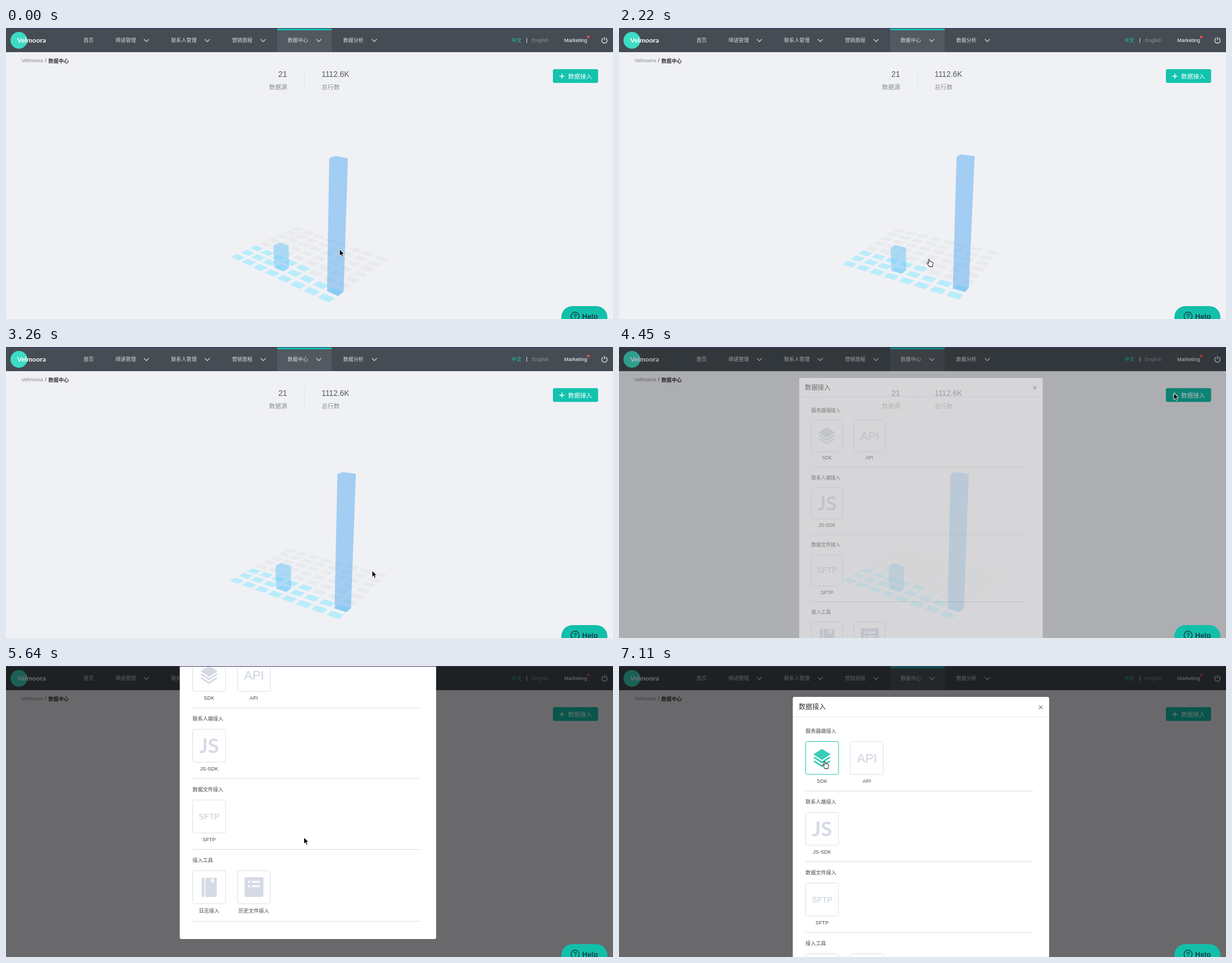
Write an HTML page that moves like this. It is 1081 px wide and 518 px high and loops after 8 s.

```html
<!DOCTYPE html>
<html lang="zh-CN">
<head>
<meta charset="utf-8">
<title>数据中心</title>
<style>
html, body { margin: 0; width: 100%; height: 100%; overflow: hidden; background: #f0f1f5; }
svg { display: block; width: 100%; height: 100%; }
text { font-family: "Liberation Sans", "Noto Sans CJK SC", "Noto Sans CJK", sans-serif; font-size: 9.1px; }
.line { fill: none; stroke-width: 1.3; stroke-linecap: round; stroke-linejoin: round; }
</style>
</head>
<body>
<svg id="stage" viewBox="0 0 1081 518" preserveAspectRatio="none"></svg>
<script>
const STEP = 148.2, LOOP = 8000;
const TEAL = '#12c3ae', PALE = '#d5dae5';

const text = (x, y, s, fill, more = '') => `<text x="${x}" y="${y}" fill="${fill}" ${more}>${s}</text>`;
const rect = (x, y, w, h, fill, more = '') => `<rect x="${x}" y="${y}" width="${w}" height="${h}" fill="${fill}" ${more}/>`;
const size = (px, more = '') => `style="font-size:${px}px;${more}"`;
const mid = 'text-anchor="middle"';

function header() {
  const items = [
    [138, '首页'], [195, '绵语管理', 250], [294, '联系人管理', 358.5],
    [402.5, '营销旅程', 458], [501.5, '数据中心', 557], [600.5, '数据分析', 656]
  ];
  const nav = items.map(([x, s, arrow]) => text(x, 25.2, s, '#d9dbdd') +
    (arrow ? `<path class="line" stroke="#d0d3d6" d="M${arrow - 4} 20.2l4 4.2 4-4.2"/>` : '')).join('');
  return rect(0, 0, 1081, 43, '#454c53') + rect(483, 1, 97, 42, '#525960') + rect(483, 1, 97, 3, '#14bfae') +
    '<circle cx="23" cy="22" r="15" fill="#3edcc4"/>' +
    text(20, 25.5, 'Velmoora', '#fff', size(12, 'font-family:Lato,sans-serif;font-weight:700')) + nav +
    text(900, 25.2, '中文', '#17c5b0') + rect(927, 17.5, 1, 9, '#d9dbdd') + text(936.5, 25, 'English', '#8d9297') +
    text(994, 25, 'Marketing', '#fff', size(9.3)) + '<circle cx="1037" cy="16" r="2.3" fill="#f0504f"/>' +
    '<path class="line" stroke="#e6e7e9" d="M1063 18.4a4.8 4.8 0 1 0 5.6 0M1065.8 16.4v5"/>';
}

function page() {
  return rect(0, 0, 1081, 518, '#f0f1f5') + header() +
    text(27.5, 61.3, 'Velmoora', '#85888c') + text(69.5, 61.3, '/', '#333') +
    text(75.5, 61.6, '数据中心', '#333', 'font-weight="700"') +
    text(500.5, 86.8, '21', '#55585c', size(14) + ' text-anchor="end"') +
    text(468.5, 109.3, '数据源', '#8a8c90', size(10.7)) + rect(531, 72, 1, 40, '#e1e4e8') +
    text(562, 86.8, '1112.6K', '#55585c', size(13.8)) + text(562, 109.3, '总行数', '#8a8c90', size(10.7)) +
    rect(974, 73.3, 80.5, 24.5, TEAL, 'rx="3" id="button"') +
    '<path d="M985.5 85.7h9M990 81.2v9" stroke="#fff" stroke-width="1.4"/>' +
    text(1001, 89.6, '数据接入', '#fff', size(10.7, 'font-weight:500')) +
    '<path id="grey" fill="#e8eaed"/><path id="cyan" fill="#b9ecfb"/>' +
    '<path id="small" fill="rgb(118,200,248)" fill-opacity=".55"/>' +
    '<path id="tall" fill="rgb(100,177,241)" fill-opacity=".55"/>';
}

const LAYERS = '<path d="M361.5 147.5l15.5 9.8-15.5 10-15.5-10z"/>' +
  [163.2, 170].map(y => `<path d="M346 ${y}l2.6-1.7 12.9 8.3 12.9-8.3 2.6 1.7-15.5 10z"/>`).join('');
const BOOK = rect(348.5, 525, 5, 34, PALE, 'rx="1.5"') + rect(355.2, 525, 20.3, 34, PALE, 'rx="1.5"') +
  '<path d="M365.5 526.5h4.6v7.6l-2.3-2-2.3 2z" fill="#fff"/>';
const LIST = rect(425, 524, 33.5, 35, PALE, 'rx="3"') +
  [532, 540].map(y => `<circle cx="432.5" cy="${y}" r="1.9" fill="#fff"/>` + rect(437.5, y - 1.4, 15, 2.8, '#fff', 'rx="1"')).join('');

function card(col, top, name, capY, art, id = '') {
  const x = 332.5 + 79.5 * col;
  return rect(x, top, 58.5, 58.5, '#fff', `rx="3" stroke="#dcdfe6" ${id}`) + art +
    text(x + 29.2, capY, name, '#4a4a4a', mid);
}

function modal() {
  const glyph = (x, y, s, px, more) => text(x, y, s, PALE, mid + ' ' + size(px, more));
  const titles = ['服务器端接入', '联系人端接入', '数据文件接入', '接入工具'];
  const rules = [222, 348, 474, 602];
  return rect(309.5, 55, 456.5, 431 + 148, '#fff', 'rx="3"') +
    text(320, 77.3, '数据接入', '#333', size(12.1, 'font-weight:500')) +
    '<path d="M748 70.5l6 6M754 70.5l-6 6" stroke="#8a8a8a" stroke-width="1.3"/>' +
    rect(309.5, 90, 456.5, 1, '#e6e7ea') +
    titles.map((s, i) => text(332.3, 119.2 + 126 * i, s, '#4a4a4a') + rect(332, rules[i], 405.5, 1, '#dedede')).join('') +
    card(0, 134.5, 'SDK', 207.8, `<g id="layers" fill="${PALE}">${LAYERS}</g>`, 'id="sdk"') +
    card(1, 134.5, 'API', 207.8, glyph(441.7, 171.8, 'API', 22, `stroke:${PALE};stroke-width:.5px`)) +
    card(0, 260.5, 'JS-SDK', 333.8, glyph(361.7, 303, 'JS', 36, 'font-family:Lato,sans-serif;font-weight:700')) +
    card(0, 386.5, 'SFTP', 459.8, glyph(361.7, 420.6, 'SFTP', 14.5, 'font-weight:700')) +
    card(0, 512.5, '日志接入', 587, BOOK) + card(1, 512.5, '历史文件接入', 587, LIST);
}

const help = rect(989, 495, 82, 44, '#12bfaa', 'rx="20"') +
  '<circle cx="1013.5" cy="513" r="7.2" fill="none" stroke="#17434a" stroke-width="1.5"/>' +
  text(1013.5, 517, '?', '#17434a', mid + ' ' + size(11, 'font-weight:700')) +
  text(1026, 517.6, 'Help', '#17434a', size(13, 'font-weight:700'));

const pointer = '<path id="arrow" d="M0 0V11.7L2.7 9.2 4.5 13.3 6.6 12.4 4.8 8.4H8.4Z" fill="#000" stroke="#fff" stroke-width=".9"/>' +
  '<path id="hand" d="M-1.2 1C-1.2-.6 1-.6 1.2 1L1.8 4.2C2.4 3.4 3.6 3.6 3.8 4.6 4.4 3.9 5.5 4.2 5.7 5.2 6.4 4.8 7.2 5.2 7.3 6.2 7.5 8.4 6.9 9.6 6.2 10.8V12.8H.4L-.2 11-3.6 7.4C-4.4 6.2-3 5.2-2 6L-.5 7.2Z" fill="#fff" stroke="#000" stroke-width="1"/>';

document.getElementById('stage').innerHTML = page() +
  rect(0, 0, 1081, 518, '#000', 'id="mask"') + `<g id="modal">${modal()}</g>` + help +
  rect(0, 0, 1081, 1, '#47316b') + `<g id="pointer">${pointer}</g>`;

const el = {};
document.querySelectorAll('[id]').forEach(e => el[e.id] = e);

// Rows: step, then values
const CURSOR = [
  [0, 594, 394], [3, 627, 414], [6, 627, 414], [11, 710, 404], [15, 552, 412], [17, 600, 428],
  [20, 757, 350], [22, 652, 398], [28, 988, 82], [32, 988, 82], [36, 530.5, 305], [42, 530.5, 305], [48, 366, 170]
];
const VIEW = [
  [6, 40, 20], [11, 27.4, 19], [13, 27, 17.8], [15, 28.8, 20], [17, 30.5, 21.3], [20, 35, 14], [22, 33.7, 18.5]
];
const SCROLL = [[34, 0], [38, 148], [40, 148], [46, 0]];
const OPEN = [[29, 0], [31, 1]];

function at(rows, n) {
  const i = rows.findIndex(r => r[0] > n);
  if (i === 0) return rows[0].slice(1);
  if (i < 0) return rows[rows.length - 1].slice(1);
  const a = rows[i - 1], b = rows[i];
  const k = (n - a[0]) / (b[0] - a[0]), e = k * k * (3 - 2 * k);
  return a.slice(1).map((v, j) => v + (b[j + 1] - v) * e);
}

// Orbit camera around a 100 x 100 x 80 box
function camera(beta, alpha) {
  const r = Math.PI / 180, cb = Math.cos(beta * r), sb = Math.sin(beta * r);
  const ca = Math.cos(alpha * r), sa = Math.sin(alpha * r);
  return (p, q, h = 0) => {
    const x = p * cb + q * sb, z = p * sb - q * cb, y = h - 50;
    const s = 745 / (310 - z * ca - y * sa);
    return (540.5 + x * s).toFixed(2) + ' ' + (302.5 - (y * ca - z * sa) * s).toFixed(2);
  };
}

const A = 4.55, B = 3.25;
const row = i => (i - 3.5) * 12.5, col = j => (j - 3.5) * 10;
const poly = pts => 'M' + pts.join('L') + 'Z';

function bar(cam, i, j, h) {
  const p = row(i), q = col(j);
  return poly([cam(p - A, q - B, h), cam(p - A, q + B, h), cam(p + A, q + B, h),
    cam(p + A, q + B), cam(p + A, q - B), cam(p - A, q - B)]);
}

function drawChart(cam) {
  const d = ['', ''];
  for (let k = 0; k < 64; k++) {
    const p = row(k % 8), q = col(k >> 3);
    d[k < 21 ? 0 : 1] += poly([cam(p - A, q - B), cam(p - A, q + B), cam(p + A, q + B), cam(p + A, q - B)]);
  }
  el.cyan.setAttribute('d', d[0]);
  el.grey.setAttribute('d', d[1]);
  el.small.setAttribute('d', bar(cam, 3, 1, 18.3));
  el.tall.setAttribute('d', bar(cam, 7, 1, 92.6));
}

function draw(n) {
  drawChart(camera(...at(VIEW, n)));

  const [open] = at(OPEN, n), [scroll] = at(SCROLL, n), zoom = 0.9 + 0.1 * open;
  el.mask.setAttribute('opacity', 0.56 * open);
  el.modal.setAttribute('opacity', open);
  el.modal.setAttribute('transform', `translate(${538 * (1 - zoom)} ${55 * (1 - zoom) - scroll}) scale(${zoom})`);

  el.button.setAttribute('fill', n >= 27 && n <= 32 ? '#10b5a1' : TEAL);
  const over = n >= 47;
  el.sdk.setAttribute('stroke', over ? '#1fc3af' : '#dcdfe6');
  el.layers.setAttribute('fill', over ? '#3accba' : PALE);

  const [x, y] = at(CURSOR, n);
  const hand = over || (n >= 14 && n <= 16) || (n >= 27 && n <= 29);
  el.pointer.setAttribute('transform', `translate(${x} ${y})`);
  el.hand.setAttribute('visibility', hand ? 'visible' : 'hidden');
  el.arrow.setAttribute('visibility', hand ? 'hidden' : 'visible');
}

const start = performance.now();
let last = -1;
function tick() {
  const t = Math.max(0, performance.now() - start) % LOOP;
  const n = Math.floor((t + 5) / STEP);
  if (n !== last) draw(last = n);
  requestAnimationFrame(tick);
}
tick();
</script>
</body>
</html>
```
